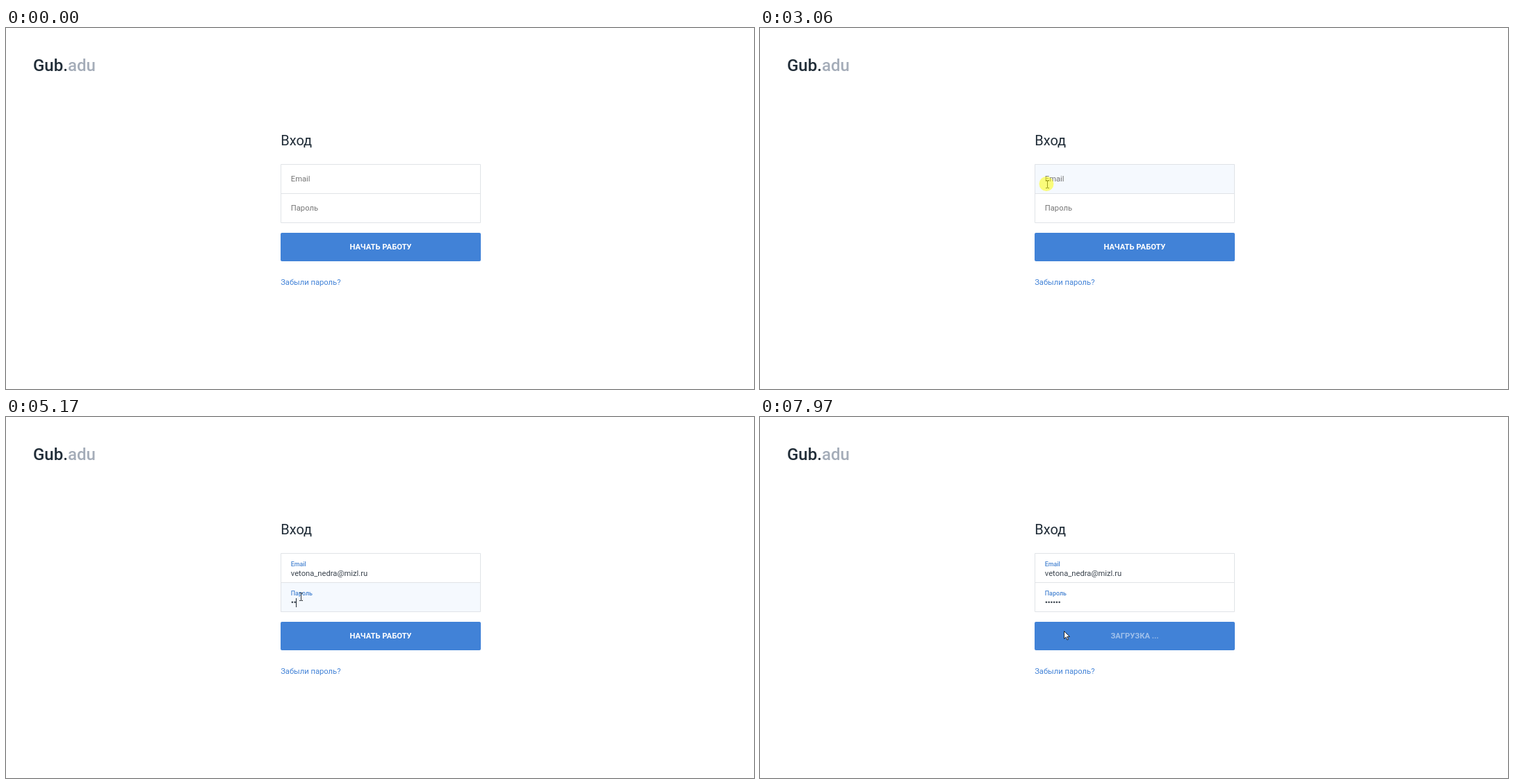
Write an HTML page that moves like this. It is 1076 px wide and 520 px high and loops after 8 s.

```html
<!DOCTYPE html>
<html lang="ru">
<head>
<meta charset="utf-8">
<title>Вход</title>
<style>
  html, body { margin: 0; width: 100%; height: 100%; overflow: hidden; background: #fff; }
  svg { display: block; font: 11.2px Roboto, sans-serif; }
  .line { fill: none; stroke: #e0e3e7; }
  .caret { fill: #222b35; }
  .value { fill: #3b444e; }
  #halo { fill: #ff0; fill-opacity: .52; }
  #cursor path { fill: #fff; stroke: #15181c; stroke-width: .9; stroke-linejoin: round; }
  #cursor #beam { fill: none; stroke: #30363c; stroke-width: 1; }
</style>
</head>
<body>
<svg width="1076" height="520" viewBox="0 0 1076 520">
  <text x="39" y="62" font-size="24" font-weight="500" fill="#212d38">Gub.<tspan fill="#a5adb9">adu</tspan></text>
  <text x="395.2" y="169" font-size="20" fill="#212d38">Вход</text>

  <rect id="emailBox" x="395" y="196" width="288" height="43"/>
  <rect id="passBox" x="395" y="238" width="288" height="43"/>
  <path class="line" d="M395.5 196.5h287v84h-287zM395.5 238.5h287"/>
  <text id="emailLabel" x="409.8">Email</text>
  <text id="passLabel" x="409.8">Пароль</text>
  <text id="email" class="value" x="409.8" y="229">vetona_nedra@mizl.ru</text>
  <g id="dots" class="value"></g>
  <rect id="caret" class="caret" width="1" height="13"/>

  <rect id="button" x="395" y="295" width="288" height="41" rx="2"/>
  <text id="action" font-weight="700" x="539" y="319" text-anchor="middle" fill="#fff"></text>
  <text x="395.2" y="370" fill="#4182d7">Забыли пароль?</text>

  <g id="cursor">
    <path id="beam" d="M-2.5-5.5h2l.5.5.5-.5h2M0-5V5M-2.5 5.5h2L0 5l.5.5h2"/>
    <path id="arrow" d="M0 0V11l2.6-2.4 1.8 4 1.7-.8-1.8-3.9H8z"/>
    <path id="hand" d="M-1.5 8V.5a1.4 1.4 0 0 1 2.8 0V5q1.3-.8 2.2.4 1.4-.7 2.1.5 1.8-.4 1.8 1.4v3.2q0 2-1.2 3.2v1.8H.3q-.8-1.8-3-4.4-1.6-1.8-1.2-2.8 1-1 2.4.7zM1.3 5v3M3.5 5.4V8M5.6 5.9v2.3"/>
  </g>
  <circle id="halo" r="10.5"/>
</svg>
<script>
const LOOP = 8000, STEP = 75;
const $ = id => document.getElementById(id);
const show = (id, on) => $(id).style.display = on ? '' : 'none';
const set = (id, attrs) => { for (const k in attrs) $(id).setAttribute(k, attrs[k]); };
const clamp = v => Math.min(1, Math.max(0, v));
const within = (t, a, b) => t >= a && t < b;

// pointer stops: time, x, y
const stops = [
  [660, 946, 510], [1440, 483, 276], [1740, 441, 251], [2190, 413, 225],
  [3770, 413, 225], [4480, 424, 259], [6725, 424, 259], [7340, 437.5, 308.5]
];
const keys = [4850, 5170, 5540, 5860, 6240, 6470];
const dotGap = 3.75;

for (let i = 0; i < keys.length; i++)
  $('dots').insertAdjacentHTML('beforeend', `<circle cx="${411.9 + i * dotGap}" cy="266.8" r="1.3"/>`);

function pointer(t) {
  const i = stops.findLastIndex(s => s[0] <= t);
  if (i < 0) return [-50, -50];
  const [t0, x0, y0] = stops[i], [t1, x1, y1] = stops[i + 1] || [LOOP, x0, y0];
  const u = Math.floor((t - t0) / STEP) * STEP / (t1 - t0);
  const e = 1 - (1 - u) ** 1.5;
  return [x0 + (x1 - x0) * e, y0 + (y1 - y0) * e];
}

function floatLabel(id, top, p) {
  set(id, {
    y: top + 25 - 6 * p,
    'font-size': 11.2 - 2.3 * p,
    'font-weight': p > 0 ? 500 : 400,
    fill: p > 0 ? '#4a86d2' : '#757575'
  });
}

function draw(t) {
  const [x, y] = pointer(t);
  const over = (top, bottom) => x > 395 && x < 683 && y >= top && y < bottom;
  const emailFocus = within(t, 3150, 4700), passFocus = within(t, 4700, 7890);
  const emailHover = over(196, 239), passHover = over(239, 281);
  const loading = t >= 7970, buttonHover = over(295, 336) && !loading;
  const tint = on => ({ fill: on ? '#f5f9fe' : '#fff' });

  set('emailBox', tint(emailFocus || emailHover));
  set('passBox', tint(passFocus || passHover));
  floatLabel('emailLabel', 196, clamp((t - 3150) / 240));
  floatLabel('passLabel', 238, clamp((t - 4700) / 150));

  const filled = t >= 3770, typed = keys.filter(k => k <= t).length;
  show('email', filled);
  [...$('dots').children].forEach((d, i) => d.style.display = i < typed ? '' : 'none');

  show('caret', (emailFocus || passFocus) && !within(t, 7050, 7590));
  const textWidth = emailFocus ? (filled ? emailWidth : 0) : typed * dotGap;
  set('caret', { x: Math.round(409 + textWidth), y: emailFocus ? 219 : 261 });

  set('button', { fill: buttonHover ? '#4b89d9' : '#4182d7' });
  $('action').textContent = loading ? 'ЗАГРУЗКА ...' : 'НАЧАТЬ РАБОТУ';
  set('action', { 'fill-opacity': loading ? .5 : 1 });

  show('halo', within(t, 3060, 3310) || within(t, 4630, 4780) || within(t, 7810, 7970));
  set('halo', { cx: x - 1, cy: y - .5 });
  const beam = emailHover || passHover;
  show('beam', beam);
  show('hand', buttonHover);
  show('arrow', !beam && !buttonHover);
  set('cursor', { transform: `translate(${x + (beam ? .5 : 0)} ${y})` });
}

const emailWidth = $('email').getComputedTextLength();
const start = performance.now();
function tick() {
  draw((performance.now() - start) % LOOP);
  requestAnimationFrame(tick);
}
tick();
</script>
</body>
</html>
```
